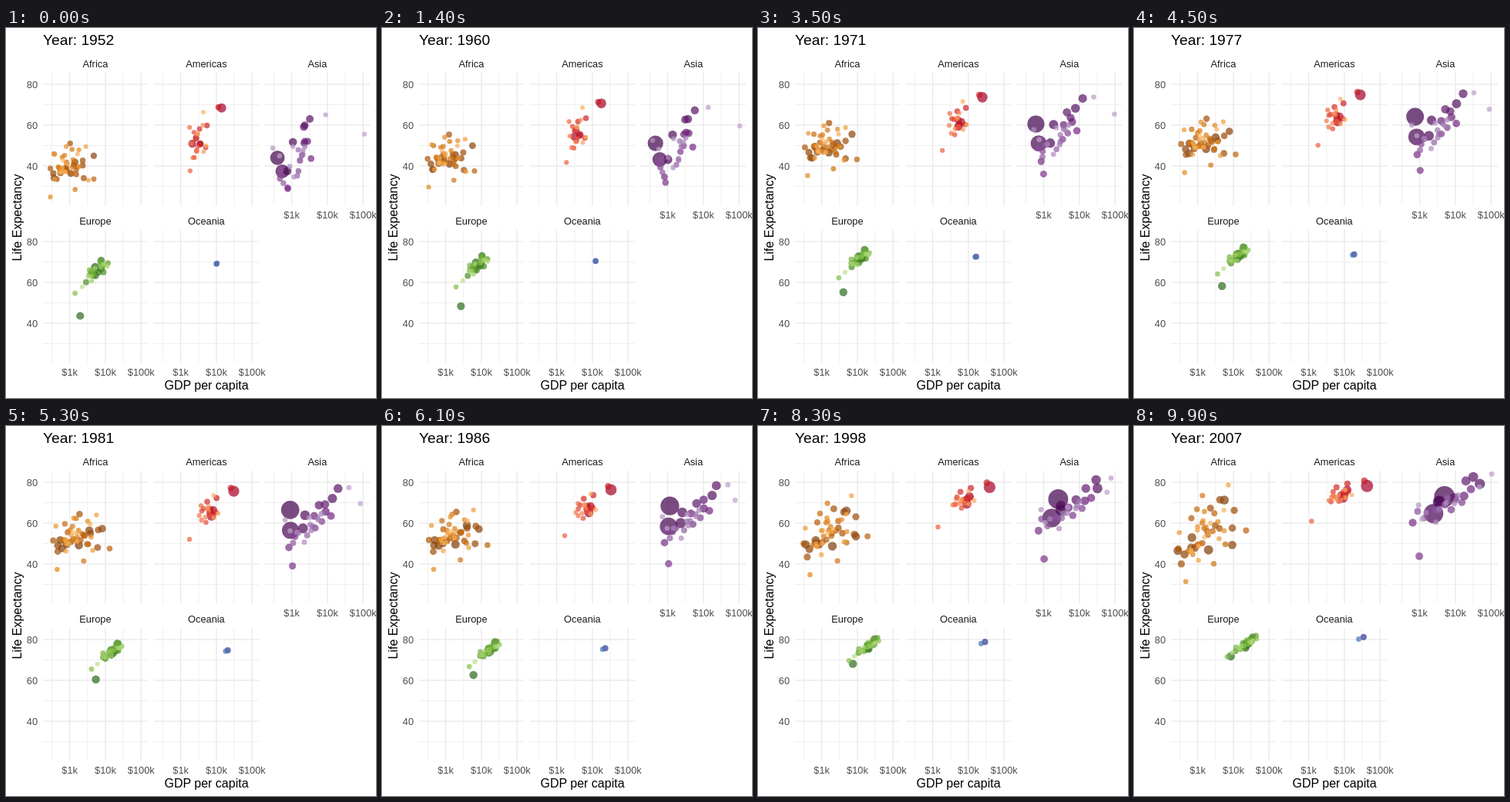
These frames come from a looping animation (480 by 480 pixels, 10 s). An HTML page:

```html
<!DOCTYPE html>
<html lang="en">
<head>
<meta charset="utf-8">
<title>Life expectancy and GDP</title>
<style>
html, body { margin: 0; width: 100%; height: 100%; overflow: hidden; background: #fff; }
svg { display: block; width: 480px; height: 480px; font: 12.8px "Liberation Sans", Arial, sans-serif; }
.big { font-size: 16px; }
.title { font-size: 19.2px; }
.tick { fill: #4d4d4d; }
.strip { fill: #1a1a1a; }
.mid { text-anchor: middle; }
.end { text-anchor: end; }
</style>
</head>
<body>
<svg id="stage" viewBox="0 0 480 480"></svg>
<script>
// n: dots, ranked from most to least populous
// marked: dots that stand out, by rank: GDP and life at the start, then at the end [, GDP bend, life bend]
// from, to: the cloud of the other dots: mean log GDP, its spread, mean life, slope, noise
// pop(rank): final population in millions; start: share of it in the first year
const panels = [
  { name: "Africa", col: 0, row: 0, n: 52, ramp: ["#7f3b08", "#b35806", "#e08214", "#fdb863"],
    marked: {
      0: [1077, 36.3, 2014, 46.9], 1: [1419, 41.9, 5581, 71.3], 2: [362, 34.1, 691, 52.9],
      3: [781, 39.1, 278, 46.5], 4: [4725, 45, 9270, 49.3]
    },
    from: [2.97, .29, 39, .6, 4.8], to: [3.18, .42, 55, 4, 7.5],
    pop: i => 115 * Math.exp(-.1 * i), start: .27, dx: .08, dy: gain => 12 - .45 * gain },
  { name: "Americas", col: 1, row: 0, n: 25, ramp: ["#a50026", "#d73027", "#f46d43", "#fdae61"],
    marked: {
      0: [13990, 68.4, 42952, 78.2], 1: [2109, 50.9, 9066, 72.4, .2, 1], 2: [3478, 50.8, 11978, 76.2],
      5: [11367, 68.8, 36319, 80.7], 14: [1840, 37.6, 1202, 60.9]
    },
    from: [3.48, .17, 52.5, 3.5, 7], to: [3.86, .22, 73.6, 1.8, 2.4],
    pop: i => 301 * Math.exp(-.7 * i ** .75), start: .4, dx: .08, dy: () => 2 },
  { name: "Asia", col: 2, row: 0, n: 33, xAxis: true, ramp: ["#40004b", "#762a83", "#9970ab", "#c2a5cf"],
    marked: {
      0: [400, 44, 4959, 73, -.23, 7], 1: [547, 37.4, 2452, 64.7, -.12, 4.5], 2: [750, 37.5, 3541, 70.7],
      5: [3217, 63, 31656, 82.6, .26, 3.5], 12: [779, 28.8, 975, 43.8], 31: [108382, 55.6, 47307, 77.6]
    },
    from: [3.17, .34, 46.5, 5, 6.5], to: [3.83, .52, 71, 4.5, 3.2],
    pop: i => i < 2 ? 1318 - 208 * i : 290 * Math.exp(-.14 * i), start: .38, dx: .08, dy: () => 2.2 },
  { name: "Europe", col: 0, row: 1, n: 30, xAxis: true, ramp: ["#276419", "#4d9221", "#7fbc41", "#b8e186"],
    marked: { 1: [1969, 43.6, 8458, 71.8] },
    from: [3.7, .25, 65, 4, 2], to: [4.34, .24, 77.8, 2.6, .9],
    pop: i => 90 * Math.exp(-.16 * i), start: .75, dx: .1, dy: () => 1.8 },
  { name: "Oceania", col: 1, row: 1, n: 2, xAxis: true, ramp: ["#313695", "#4575b4"],
    marked: { 0: [10040, 69.1, 34435, 81.2], 1: [10557, 69.4, 25185, 80.2] },
    pop: i => i ? 4.1 : 20.4, start: .45, dx: .03, dy: () => -.9 }
];

const stage = document.getElementById("stage");
const lerp = (a, b, t) => a + (b - a) * t;
const xAt = (p, lg) => 82.6 + 144 * p.col + (lg - 3) * 46.35;
const yAt = (p, life) => 73 + 204 * p.row + (80 - life) * 2.65;
const text = (x, y, cls, str) => `<text x="${x}" y="${y}" class="${cls}">${str}</text>`;
const line = (d, w) => `<path d="${d}" stroke="#ebebeb" stroke-width="${w}"/>`;

let seed = 11;
function rand() {
  seed = seed * 16807 % 2147483647;
  return seed / 2147483647;
}
// Bell-shaped, with unit spread
const bell = () => 2 * (rand() + rand() + rand() - 1.5);

function mix(ramp, u) {
  const k = Math.min(u * (ramp.length - 1), ramp.length - 1.001), i = Math.floor(k);
  const part = (hex, j) => parseInt(hex.slice(j, j + 2), 16);
  return `rgb(${[1, 3, 5].map(j => Math.round(lerp(part(ramp[i], j), part(ramp[i + 1], j), k - i)))})`;
}

function drawPanel(p) {
  const top = yAt(p, 85.55), bottom = yAt(p, 20.65), left = xAt(p, 2.248), right = xAt(p, 5.189);
  let s = "";
  for (const lg of [2.5, 3.5, 4.5, 3, 4, 5]) s += line(`M${xAt(p, lg)} ${top}V${bottom}`, lg % 1 ? .78 : 1.55);
  for (const life of [30, 50, 70, 40, 60, 80]) s += line(`M${left} ${yAt(p, life)}H${right}`, life % 20 ? .78 : 1.55);
  s += text((left + right) / 2, top - 7, "strip mid", p.name);
  if (p.xAxis) ["$1k", "$10k", "$100k"].forEach((t, i) => s += text(xAt(p, 3 + i), bottom + 17, "tick mid", t));
  if (!p.col) for (const life of [40, 60, 80]) s += text(41, yAt(p, life) + 4.8, "tick end", life);
  return s;
}

// A random dot that keeps most of its wealth and health rank over the years
function cloudDot(p) {
  const z = bell(), e = bell();
  const place = ([lg, spread, life, slope, noise], z, e) =>
    [10 ** Math.max(2.46, lg + spread * z), life + slope * z + noise * e];
  return [...place(p.from, z, e), ...place(p.to, .85 * z + .5 * bell(), .6 * e + .8 * bell())];
}

function makeDots(p) {
  return Array.from({ length: p.n }, (_, i) => {
    const [g0, l0, g1, l1, dx = p.dx, dy = p.dy(l1 - l0)] = p.marked[i] || cloudDot(p);
    return {
      p, dx, dy, l0, l1, x0: Math.log10(g0), x1: Math.log10(g1),
      pop: p.pop(i), fill: mix(p.ramp, i / (p.n - 1))
    };
  });
}

const dots = panels.flatMap(makeDots);
stage.innerHTML = panels.map(drawPanel).join("") +
  dots.map(d => `<circle fill="${d.fill}" fill-opacity=".7"/>`).join("") +
  `<text id="year" class="title" x="48" y="22"></text>` +
  text(260, 469, "big mid", "GDP per capita") +
  `<text class="big mid" transform="translate(20 246) rotate(-90)">Life Expectancy</text>`;
const circles = stage.querySelectorAll("circle");
const year = document.getElementById("year");

function draw(now) {
  const t = Math.floor(now / 100) % 100 / 99, bend = Math.sin(Math.PI * t);
  year.textContent = "Year: " + Math.round(1952 + 55 * t);
  dots.forEach((d, i) => {
    const c = circles[i], pop = d.pop * lerp(d.p.start, 1, t);
    c.setAttribute("cx", xAt(d.p, lerp(d.x0, d.x1, t) + d.dx * bend));
    c.setAttribute("cy", yAt(d.p, lerp(d.l0, d.l1, t) + d.dy * bend));
    c.setAttribute("r", 2.84 + 10.67 * Math.sqrt(pop / 1318));
  });
  requestAnimationFrame(draw);
}
draw(performance.now());
</script>
</body>
</html>
```
